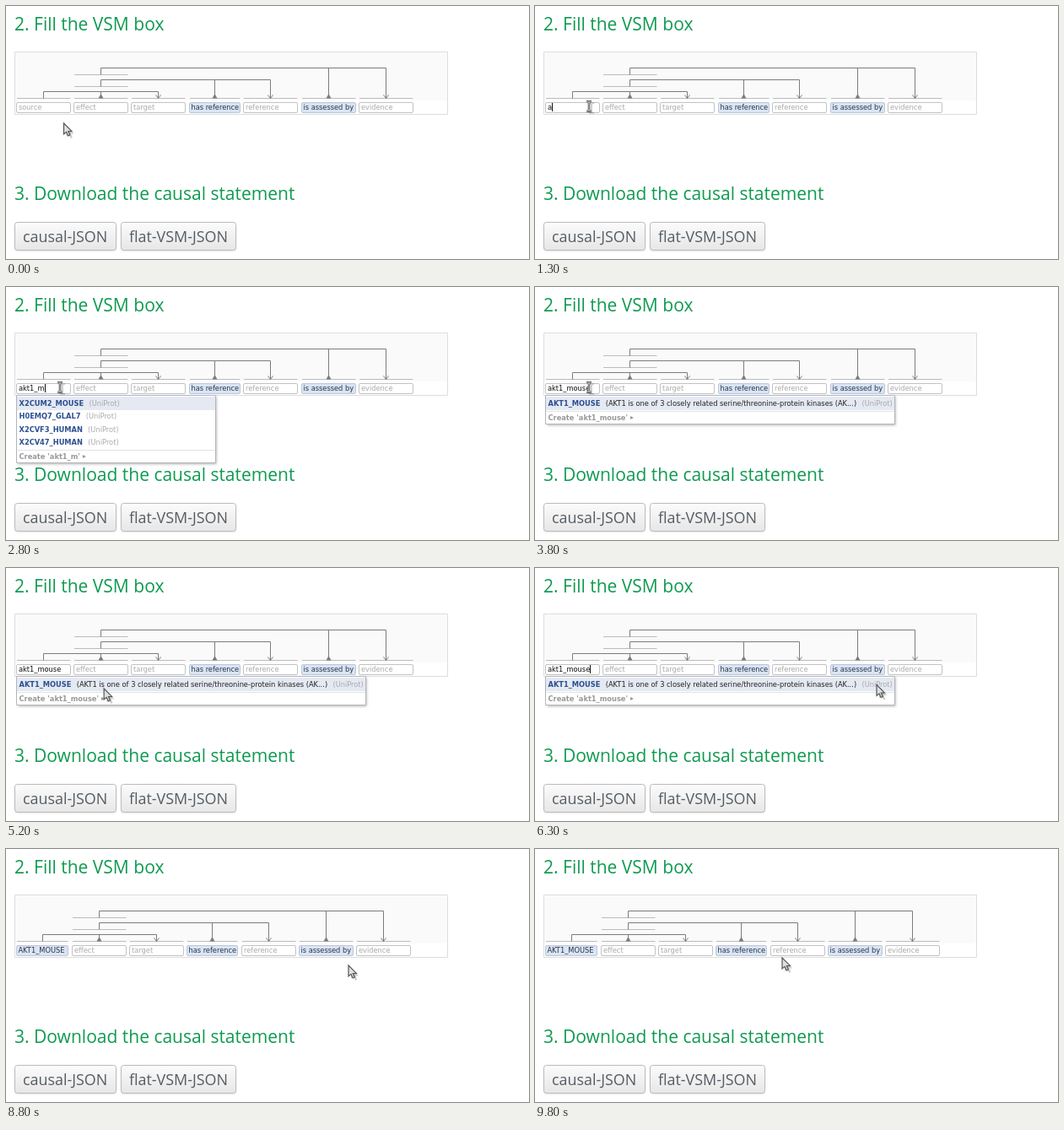
An HTML page with a canvas that plays this animation: 620x300 px, repeating every 9.9 s.

```html
<!DOCTYPE html>
<html lang="en">
<head>
<meta charset="utf-8">
<title>Fill the VSM box</title>
<style>
html, body { margin: 0; width: 100%; height: 100%; overflow: hidden; background: #fff; }
canvas { display: block; width: 620px; height: 300px; }
</style>
</head>
<body>
<canvas id="stage" width="620" height="300"></canvas>
<script>
const ctx = document.getElementById('stage').getContext('2d');
const LOOP = 9900;
const UI = '9.2px "DejaVu Sans", sans-serif';
const BOLD = 'bold ' + UI;
const TITLE = '21px "Open Sans", sans-serif';
const BUTTON = '17.9px "Open Sans", sans-serif';
const CONDENSED = 0.9; // the condensed cut of the UI font
const WIRE = '#7c7c7c';

// Text and caret states: [from, typed text]
const typing = [
  [600, ''], [1300, 'a'], [1400, 'ak'], [1500, 'akt'], [1900, 'akt1'], [2500, 'akt1_'],
  [2800, 'akt1_m'], [2900, 'akt1_mo'], [3100, 'akt1_mou'], [3200, 'akt1_mous'], [3300, 'akt1_mouse']
];
const blinks = [600, 3800, 4200, 5100, 5600, 6900];
const PICKED = 8300;

const kinase = '(AKT1 is one of 3 closely related serine/threonine-protein kinases (AK...)';
const worm = '(Acts downstream of PI3 kinase age-1 and kinase pdk-1 in the daf-2/ins...)';
const mlvat = ['AKT_MLVAT', ''];
const mouse = ['AKT1_MOUSE', kinase];
const human = ['AKT1_HUMAN', kinase];
const worm1 = ['AKT1_CAEEL', worm];
const worm2 = ['AKT2_CAEEL', worm];
const subunit = ['AKTS1_HUMAN', '(Subunit of mTORC1, which regulates cell growth and survival in respo...)'];
const channel = ['AKT2_ARATH', '(Highly selective and weak inward-rectifying potassium channel. Plays ...)'];
const loose = ['X2CUM2_MOUSE', 'H0EMQ7_GLAL7', 'X2CVF3_HUMAN', 'X2CV47_HUMAN'].map(id => [id, '']);

// Suggestion lists: [from, rows]
const lists = [
  [1600, [mlvat, mouse, worm1, worm2, subunit, channel, human]],
  [2100, [mouse, worm1, human, worm2, subunit, channel, mlvat]],
  [2800, loose],
  [2900, []],
  [3400, [mouse]],
  [PICKED, null]
];

// Pointer moves: [start, end, x, y, dip]
const moves = [
  [0, 0, 68.5, 139, 0],
  [0, 400, 64, 119, 0],
  [4100, 4700, 84, 142, 0],
  [5000, 6000, 393, 140, 2],
  [6200, 6300, 405, 138.5, 0],
  [6600, 6700, 406, 138, 0],
  [9700, 9800, 293, 129, 0]
];

function latest(list, t) {
  let found = null;
  for (const [from, value] of list) if (t >= from) found = value;
  return found;
}

const squeeze = font => font === UI || font === BOLD ? CONDENSED : 1;

function width(str, font) {
  ctx.font = font;
  return ctx.measureText(str).width * squeeze(font);
}

function text(str, x, y, font, color) {
  const w = width(str, font);
  ctx.save();
  ctx.translate(x, y);
  ctx.scale(squeeze(font), 1);
  ctx.fillStyle = color;
  ctx.fillText(str, 0, 0);
  ctx.restore();
  return w;
}

function rect(x, y, w, h, fill, stroke, r = 0) {
  ctx.beginPath();
  ctx.roundRect(x + 0.5, y + 0.5, w - 1, h - 1, r);
  ctx.fillStyle = fill;
  ctx.fill();
  if (stroke) {
    ctx.strokeStyle = stroke;
    ctx.lineWidth = 1;
    ctx.stroke();
  }
}

function line(color, ...pts) {
  ctx.beginPath();
  for (let i = 0; i < pts.length; i += 2) ctx.lineTo(pts[i] + 0.5, pts[i + 1] + 0.5);
  ctx.strokeStyle = color;
  ctx.lineWidth = 1;
  ctx.stroke();
}

function shape(pts, fill) {
  ctx.beginPath();
  for (let i = 0; i < pts.length; i += 2) ctx.lineTo(pts[i], pts[i + 1]);
  ctx.closePath();
  ctx.fillStyle = fill;
  ctx.fill();
}

function button(label, x, w) {
  ctx.save();
  ctx.shadowColor = 'rgba(0,0,0,.15)';
  ctx.shadowBlur = 2;
  ctx.shadowOffsetY = 1;
  const g = ctx.createLinearGradient(0, 256, 0, 290);
  g.addColorStop(0, '#fcfcfc');
  g.addColorStop(1, '#e6e6e6');
  rect(x, 256, w, 34, g, null, 3);
  ctx.restore();
  rect(x, 256, w, 34, g, '#bbb', 3);
  text(label, x + 10, 280, BUTTON, '#555d64');
}

function connector(y, subject, verb, object, top) {
  const tip = 109;
  line(WIRE, subject, top, subject, y, object, y, object, tip);
  line(WIRE, verb, y, verb, tip);
  shape([verb + 0.5, 104, verb + 3.5, 109.5, verb - 2.5, 109.5], WIRE);
  line(WIRE, object - 3, 105, object, tip, object + 3, 105);
}

function vsmBox(t) {
  const picked = t >= PICKED;
  const typed = latest(typing, t);
  rect(10, 54, 514, 75, '#fff', '#ddd');
  ctx.fillStyle = '#fafafa';
  ctx.fillRect(11, 55, 512, 57);

  const fields = [
    ['source', picked ? 62.3 : 65], ['effect', 65], ['target', 65], ['has reference', 61.4],
    ['reference', 65], ['is assessed by', 65], ['evidence', 65]
  ];
  const mid = [];
  let left = 12;
  fields.forEach(([label, w], i) => {
    const x = Math.round(left), span = Math.round(left + w) - x;
    const term = i === 3 || i === 5 || (picked && i === 0);
    mid.push(Math.floor(left + w / 2));
    line('#bbb', x + 0.5, 109, x + span - 1, 109);
    if (i === 1) for (const y of [95, 81]) line('#bbb', x + 0.5, y, x + span - 1, y);
    rect(x, 114, span, 13, term ? '#dae4f3' : '#fff', term ? '#bcc8da' : '#c2c2c2', 1.5);
    if (i === 0 && !picked && typed !== null) {
      const end = x + 3 + text(typed, x + 3, 123, UI, '#111');
      const on = blinks.filter(b => t >= b).length % 2 === 1;
      if (on) {
        ctx.fillStyle = '#111';
        ctx.fillRect(Math.round(end), 115, 1, 10);
      }
    } else {
      text(i === 0 && picked ? 'AKT1_MOUSE' : label, x + (term ? 2.4 : 3), 123, UI, term ? '#26344a' : '#aaa');
    }
    left += w + 3.24;
  });

  connector(101, mid[0], mid[1], mid[2], 109);
  connector(87, mid[1], mid[3], mid[4], 95);
  connector(73, mid[1], mid[5], mid[6], 81);
}

function dropdown(rows, typed) {
  const GAP = 6.3, STEP = 15.2, X = 15.5;
  const rowWidth = ([id, info]) =>
    width(id, BOLD) + GAP + (info ? width(info, UI) + GAP : 0) + width('(UniProt)', UI);
  const w = Math.round(Math.max(237, ...rows.map(r => rowWidth(r) + 6.5)));
  const createY = 140.2 + rows.length * STEP;
  const h = Math.round(createY + 8) - 128;

  ctx.save();
  ctx.shadowColor = 'rgba(0,0,0,.3)';
  ctx.shadowBlur = 3;
  ctx.shadowOffsetX = 1;
  ctx.shadowOffsetY = 1.5;
  rect(12, 128, w, h, '#fff');
  ctx.restore();
  rect(12, 128, w, h, '#fff', '#b0b5bd');

  rows.forEach(([id, info], i) => {
    const y = Math.round(141.2 + i * STEP);
    if (i === 0) {
      ctx.fillStyle = '#e4e9f2';
      ctx.fillRect(13, 130, w - 2, 16);
    }
    let x = X + text(id, X, y, BOLD, '#2c4f91') + GAP;
    if (info) x += text(info, x, y, UI, '#222') + GAP;
    text('(UniProt)', x, y, UI, '#aaa');
  });

  const sep = Math.round(createY - 8);
  if (rows.length) line('#e2e2e2', 13, sep, 10 + w, sep);
  const end = X + text(`Create '${typed}'`, X, Math.round(createY + 3), BOLD, '#999') + 3;
  const cy = Math.round(createY);
  shape([end, cy - 2, end + 4, cy, end, cy + 2], '#999');
}

function tooltip() {
  rect(405, 149, 199, 22, '#fff', '#999');
  text('https://www.uniprot.org/uniprot/P31750', 411, 163, UI, '#444');
}

function arrow(x, y) {
  const pts = [0, 0, 0, 13, 3, 10.4, 5.2, 15, 7.4, 14, 5.3, 9.6, 9.4, 9.4];
  ctx.save();
  ctx.translate(x + 3, y + 3);
  shape(pts, 'rgba(0,0,0,.2)');
  ctx.translate(-3, -3);
  shape(pts, '#e0e0e0');
  ctx.strokeStyle = '#555';
  ctx.lineWidth = 1.2;
  ctx.stroke();
  ctx.restore();
}

function beam(x, y) {
  const draw = (color, weight) => {
    ctx.beginPath();
    for (const s of [-1, 1]) {
      ctx.moveTo(x - 3, y + 6 * s);
      ctx.quadraticCurveTo(x, y + 6 * s, x, y + 4 * s);
      ctx.quadraticCurveTo(x, y + 6 * s, x + 3, y + 6 * s);
    }
    ctx.moveTo(x, y - 5);
    ctx.lineTo(x, y + 5);
    ctx.strokeStyle = color;
    ctx.lineWidth = weight;
    ctx.stroke();
  };
  ctx.save();
  ctx.translate(3, 2);
  draw('rgba(0,0,0,.18)', 2);
  ctx.translate(-3, -2);
  draw('#555', 2.6);
  draw('#ccc', 0.9);
  ctx.restore();
}

function pointer(t) {
  const step = Math.floor(t / 100) * 100;
  let x = 0, y = 0;
  for (const [start, end, toX, toY, dip] of moves) {
    if (step < start) break;
    const p = end > start ? Math.min(1, (step - start) / (end - start)) : 1;
    const e = p * p * (3 - 2 * p);
    x += (toX - x) * e;
    y += (toY - y) * e + dip * Math.sin(Math.PI * p);
  }
  if (y < 127 && x < 77) beam(x, y);
  else arrow(x, y);
}

function draw(t) {
  ctx.fillStyle = '#fff';
  ctx.fillRect(0, 0, 620, 300);
  text('2. Fill the VSM box', 10, 29, TITLE, '#0f9a50');
  text('3. Download the causal statement', 10, 230, TITLE, '#0f9a50');
  button('causal-JSON', 10, 121);
  button('flat-VSM-JSON', 136, 137);
  vsmBox(t);
  const rows = latest(lists, t);
  if (rows) dropdown(rows, latest(typing, t));
  if (t >= 7300 && t < 8100) tooltip();
  pointer(t);
}

const began = performance.now();
function tick() {
  draw((performance.now() - began) % LOOP);
  requestAnimationFrame(tick);
}
tick();
</script>
</body>
</html>
```
